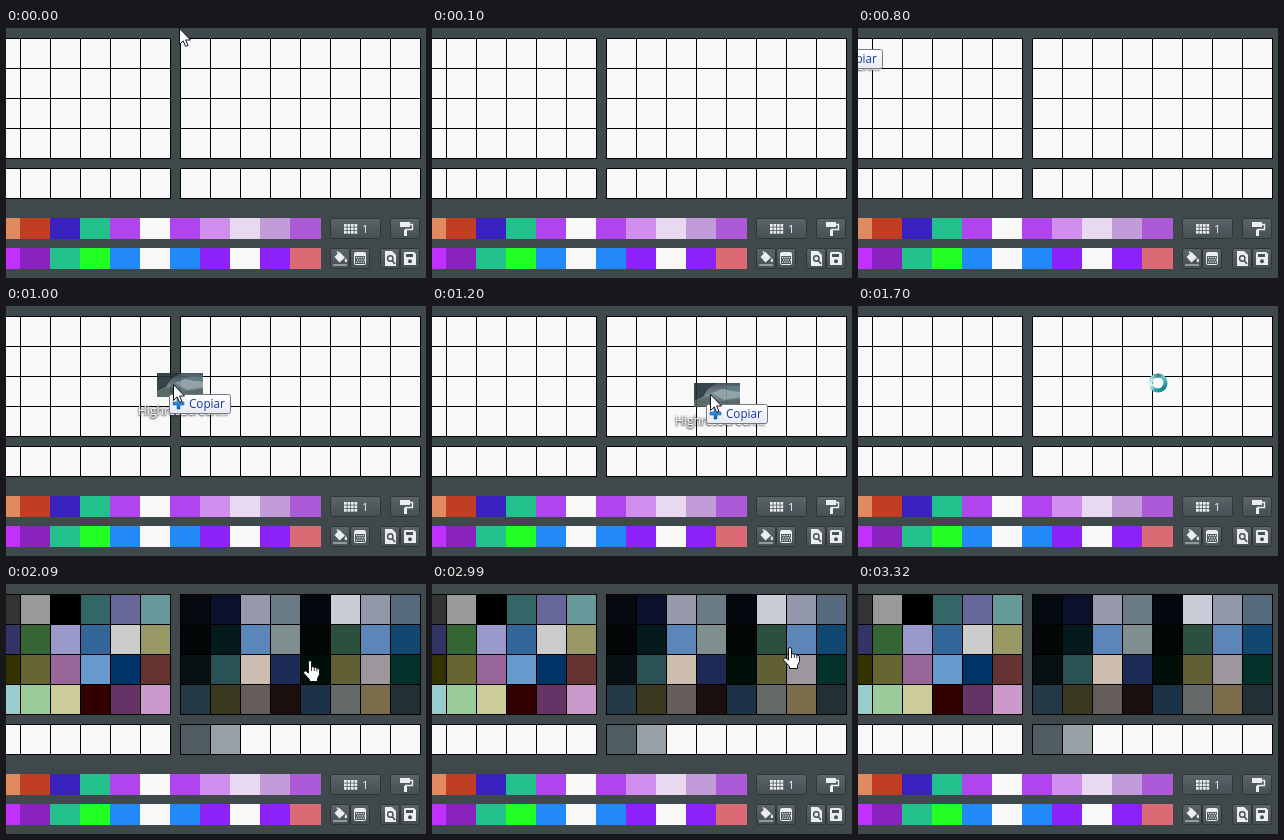
Recreate the animation shown at these times as an HTML page. Size 420 by 250 pixels, loop 3620 ms.

```html
<!DOCTYPE html>
<html lang="es">
<head>
<meta charset="utf-8">
<title>Palette import</title>
<style>
  html, body { margin: 0; width: 420px; height: 250px; overflow: hidden; background: #3f484b; }
  svg { display: block; }
  text { font-family: "Open Sans", "Noto Sans", sans-serif; }
  .button { fill: url(#face); stroke: #2f3638; }
  .icon { fill: #eceeee; }
  .line { fill: none; stroke: #eceeee; }
  .cursor { fill: #fff; stroke: #10131a; stroke-linejoin: round; }
  .caption { fill: #fff; font-size: 12px; text-shadow: 0 1px 2px #222, 0 0 2px #555; }
  #ring { width: 20px; height: 20px; border-radius: 50%; }
</style>
</head>
<body>
<svg id="stage" width="420" height="250" viewBox="0 0 420 250">
  <defs>
    <linearGradient id="face" x2="0" y2="1">
      <stop stop-color="#5b6569"/><stop offset="1" stop-color="#465054"/>
    </linearGradient>
    <linearGradient id="tip" x2="0" y2="1">
      <stop stop-color="#fff"/><stop offset="1" stop-color="#e6e8f3"/>
    </linearGradient>
    <linearGradient id="plus" x2="0" y2="1">
      <stop stop-color="#5cb8f0"/><stop offset="1" stop-color="#0a58b8"/>
    </linearGradient>
    <linearGradient id="scene" x2="0" y2="1">
      <stop stop-color="#3c4b55"/><stop offset=".5" stop-color="#6d828b"/><stop offset="1" stop-color="#47545a"/>
    </linearGradient>
    <path id="arrow" class="cursor" d="M.5 .5V16.5L4.2 12.9L6.6 18.4L9 17.4L6.6 12H11.5Z"/>
    <g id="hand">
      <path class="cursor" d="M5.5 13V2.2Q5.5 .5 7 .5T8.5 2.2V7.5Q9 6.5 10 6.5T11.3 8Q11.6 7.2 12.6 7.2T13.9 8.8Q14.2 8.2 15.1 8.3T16.5 10V14.5L14.5 18.5V21.5H6.5V19.5L1 13.5Q.2 12.2 1.2 11.3T3.5 11.5Z"/>
      <path d="M8.5 7.5V11M11.3 8V11M13.9 9V11.5" fill="none" stroke="#333"/>
    </g>
  </defs>

  <g id="board"></g>
  <g id="filled"></g>
  <g id="strips"></g>

  <g>
    <rect class="button" x="324.5" y="190.5" width="50" height="20" rx="2"/>
    <g id="dots" class="icon"></g>
    <text class="icon" x="356" y="204.5" font-size="11.5">1</text>
    <rect class="button" x="384.5" y="190.5" width="29" height="20" rx="2"/>
    <path class="icon" d="M394 194H404V199H394Z"/>
    <path class="line" d="M404 196.5H406.5V201.5H399.5V203" stroke-width="1.4"/>
    <path class="icon" d="M398 202H401V208H398Z"/>
  </g>
  <g>
    <rect class="button" x="324.5" y="220.5" width="19" height="20" rx="2"/>
    <path class="icon" d="M328.5 229L333.5 224L339 229.5L333.5 234.5Z"/>
    <path class="line" d="M331 223.5L334.5 228" stroke-width="1.3"/>
    <path class="icon" d="M340 230Q342 233 340.3 234T338.7 232Z"/>
    <rect x="327" y="236" width="14" height="2" fill="#929a9d"/>
    <rect class="button" x="344.5" y="220.5" width="19" height="20" rx="2"/>
    <rect class="line" x="348.5" y="224.5" width="11" height="12" rx="1"/>
    <rect class="icon" x="349" y="225" width="10" height="3"/>
    <g id="dither" class="icon"></g>
  </g>
  <g>
    <rect class="button" x="374.5" y="220.5" width="19" height="20" rx="2"/>
    <path class="icon" d="M379 223H386L390 227V238H379Z"/>
    <circle cx="384.3" cy="230.5" r="2.7" fill="none" stroke="#465054" stroke-width="1.4"/>
    <path d="M386.2 232.6L389 236" stroke="#465054" stroke-width="1.6"/>
    <rect class="button" x="394.5" y="220.5" width="19" height="20" rx="2"/>
    <path class="icon" d="M399 224H408L410 226V237H398V225Z"/>
    <path d="M400 226H407V229H400Z" fill="#465054"/>
    <circle cx="404" cy="233.3" r="2" fill="#465054"/>
  </g>

  <g id="drag">
    <g opacity=".92">
      <rect width="46" height="24" fill="url(#scene)"/>
      <path d="M0 0H24L14 6L9 14L0 18Z" fill="#26363b"/>
      <path d="M18 10L28 6L46 9V14L30 17Z" fill="#8b9da3"/>
      <path d="M0 18L14 14L26 19L46 16V24H0Z" fill="#4c5f5b"/>
      <path d="M30 3H46V7L36 8Z" fill="#53727d"/>
    </g>
    <text class="caption" x="-19" y="42">HighresScreen...</text>
    <rect x="12.5" y="21.5" width="61" height="19" rx="2" fill="url(#tip)" stroke="#767a80"/>
    <path d="M20 25H23V29H27V32H23V36H20V32H16V29H20Z" fill="url(#plus)" stroke="#1762b0" stroke-width=".6"/>
    <text x="32" y="35" font-size="11.7" fill="#173a9c">Copiar</text>
    <use href="#arrow" x="16" y="11"/>
  </g>
  <foreignObject id="wait" x="290" y="67" width="20" height="20"><div id="ring"></div></foreignObject>
  <use id="pointer" href="#arrow"/>
  <use id="finger" href="#hand"/>
</svg>

<script>
const LOOP = 3620;
const BLANK = '#f8f8f8';
const $ = id => document.getElementById(id);

function rect(parent, x, y, w, h, fill) {
  const r = document.createElementNS('http://www.w3.org/2000/svg', 'rect');
  Object.entries({ x, y, width: w, height: h }).forEach(([k, v]) => r.setAttribute(k, v));
  if (fill) r.setAttribute('fill', fill);
  $(parent).append(r);
}

const colors = row => row.split(' ').map(c => '#' + c);

// Empty cells on black sheets
for (const [x, cols] of [[-16, 6], [174, 8]]) {
  for (const [y, rows] of [[10, 4], [140, 1]]) {
    rect('board', x, y, cols * 30 + 1, rows * 30 + 1, '#000');
    for (let i = 0; i < cols * rows; i++)
      rect('board', x + 1 + i % cols * 30, y + 1 + Math.floor(i / cols) * 30, 29, 29, BLANK);
  }
}

function fillRows(x, y, rows) {
  rows.forEach((row, j) => colors(row).forEach((c, i) =>
    rect('filled', x + 1 + i * 30, y + 1 + j * 30, 29, 29, c)));
}
fillRows(-16, 10, [
  '333 999 000 366 669 699',
  '336 363 99c 369 ccc 996',
  '330 663 969 69c 036 633',
  '9cc 9c9 cc9 300 636 c9c'
]);
fillRows(174, 10, [
  '050a10 0b112b 9599ab 6b7b86 04080f c8ccd6 9297aa 566a7d',
  '020606 04191b 5b86b9 7f8f8f 020604 2c5040 5b86b7 104872',
  '081014 2a5254 ccbdb0 1d2a55 001008 606034 9c979c 03322c',
  '233947 3b3820 655c5c 1b100f 1c3347 636a68 7d6c4b 212f36'
]);
fillRows(174, 140, ['505c63 98a1a6']);

function strip(y, row) {
  colors(row).forEach((c, i) => rect('strips', i * 30 - 16, y, i === 10 ? 31 : 30, 21, c));
}
strip(190, 'e08a60 c23e22 3a22c0 22c08a b044ee f8f8f8 b044ee d08eee e8d8f0 c29cd8 ac5ad8');
strip(220, 'c030ff 8a22c0 22c08a 22ff22 228af8 f8f8f8 228af8 8c22f8 f8f8f8 8c22f8 dc6a74');

for (let i = 0; i < 12; i++)
  rect('dots', 338 + i % 4 * 3.5, 196 + Math.floor(i / 4) * 3.5, 2.7, 2.7);
for (let i = 0; i < 12; i++) {
  const row = Math.floor(i / 4);
  rect('dither', 350 + i % 4 * 2.3 + row % 2, 229 + row * 2.3, 1.2, 1.2);
}

// [start ms, visible part, x, y]; for the ring x is its turn in degrees
const STEPS = [
  [0, 'pointer', 173, 0],
  [100],
  [800, 'drag', -49, 0],
  [900, 'drag', 16, 27],
  [1000, 'drag', 151, 67],
  [1100, 'drag', 221, 79],
  [1200, 'drag', 262, 77],
  [1300, 'drag', 295, 71],
  [1400, 'drag', 299, 69],
  [1600, 'wait', 0],
  [1700, 'wait', 40],
  [2090, 'finger', 297, 76],
  [2990, 'finger', 351, 63],
  [3320]
];
const PARTS = ['pointer', 'drag', 'wait', 'finger'];

function turnRing(deg) {
  const ring = $('ring').style;
  ring.background = `conic-gradient(from ${deg}deg, #6fc9cf, #16848c 90deg, #2ba5a8 160deg, #e4f8f8 215deg, #9adfe0 270deg, #3b7781 320deg, #6fc9cf)`;
  const mask = 'radial-gradient(circle, transparent 5px, #000 5.8px, #000 9.2px, transparent 10px)';
  ring.webkitMask = ring.mask = mask;
}

let shown;
function draw(now) {
  const t = now % LOOP;
  const step = STEPS.findLast(s => s[0] <= t);
  if (step !== shown) {
    shown = step;
    const [, part, x, y] = step;
    PARTS.forEach(p => $(p).style.display = p === part ? '' : 'none');
    if (part === 'wait') turnRing(x);
    else if (part) $(part).setAttribute('transform', `translate(${x} ${y})`);
    $('filled').style.display = t >= 2090 ? '' : 'none';
  }
}

const start = performance.now();
function tick() {
  draw(performance.now() - start);
  requestAnimationFrame(tick);
}
tick();
</script>
</body>
</html>
```
